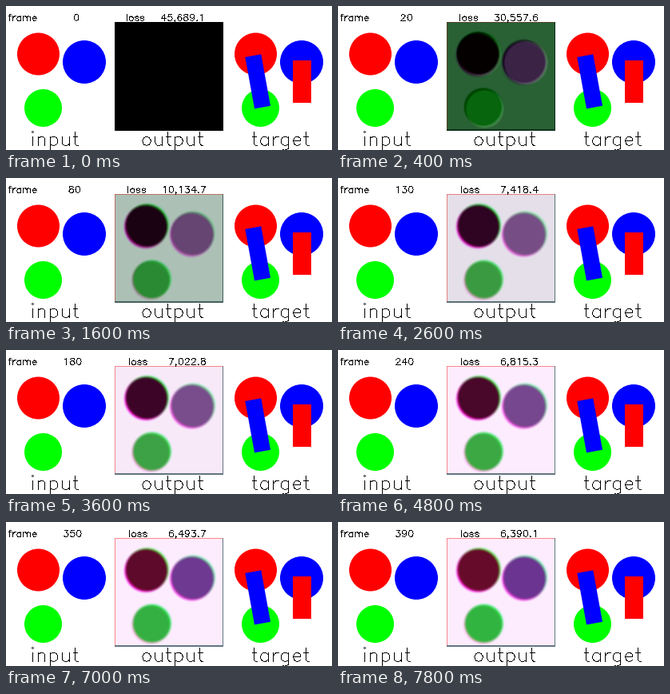
Animation, 408 px wide and 180 px high, one loop 8 s. Source, as a matplotlib script:

```python
import numpy as np
import matplotlib.pyplot as plt
from matplotlib.animation import FuncAnimation
from matplotlib.patches import Circle, Rectangle

W, H, PANEL, TOP = 408, 180, 136, 20
COUNT, STEP = 40, 10
LAST = (COUNT - 1) * STEP


# Single-stroke lettering built from lines and arcs, y up from the baseline.
def arc(cx, cy, rx, ry, start=0, end=360):
    n = max(5, round(abs(end - start) / 30) + 1)
    t = np.radians(np.linspace(start, end, n))
    return list(zip(cx + rx * np.cos(t), cy + ry * np.sin(t)))


def move(pts, dx, dy=0):
    return [(x + dx, y + dy) for x, y in pts]


def turn(pts):
    return [(20 - x, 21 - y) for x, y in pts]


DOT = [(5, 2), (4, 1), (5, 0), (6, 1), (5, 2)]
STEM = [(4, 14), (4, 0)]
BAR = [(2, 14), (9, 14)]
BOWL = arc(9.5, 7, 6.5, 7, 35, 325)
ARCH = [(4, 10)] + arc(9.5, 9, 5.5, 5, 135, 0) + [(15, 0)]
SIX = [arc(10.5, 6.5, 6.5, 6.5), arc(11, 9, 7, 12, 45, 180)]

# Each glyph: advance, strokes
GLYPHS = {
    ' ': (16, []),
    '.': (10, [DOT]),
    ',': (10, [DOT, [(6, 1), (6, -1), (4, -4)]]),
    '0': (20, [arc(10, 10.5, 7, 10.5)]),
    '1': (20, [[(6, 17), (8, 18), (11, 21), (11, 0)]]),
    '2': (20, [arc(10, 15.5, 6, 5.5, 180, -30) + [(3, 0), (17, 0)]]),
    '3': (20, [[(5, 21), (16, 21), (10, 13)] + arc(10, 6.5, 7, 6.5, 60, -150)]),
    '4': (20, [[(13, 0), (13, 21), (3, 7), (18, 7)]]),
    '5': (20, [[(15, 21), (5, 21), (4, 12)] + arc(10, 7, 7, 7, 120, -150)]),
    '6': (20, SIX),
    '7': (20, [[(3, 21), (17, 21), (7, 0)]]),
    '8': (20, [arc(10, 16.5, 6, 4.5), arc(10, 6, 7, 6)]),
    '9': (20, [turn(s) for s in SIX]),
    'a': (19, [[(15, 14), (15, 0)], BOWL]),
    'e': (18, [[(3, 8), (15, 8)] + arc(9.5, 7, 6, 7, 30, 325)]),
    'f': (12, [arc(9, 17, 4, 4, 75, 180) + [(5, 0)], BAR]),
    'g': (19, [[(15, 14)] + arc(9.5, -2, 5.5, 5, 0, -130), BOWL]),
    'i': (8, [move(DOT, -1, 20), STEM]),
    'l': (8, [[(4, 21), (4, 0)]]),
    'm': (30, [STEM, ARCH, move(ARCH, 11)]),
    'n': (19, [STEM, ARCH]),
    'o': (19, [arc(9.5, 7, 6.5, 7)]),
    'p': (19, [[(4, 14), (4, -7)], [(19 - x, y) for x, y in BOWL]]),
    'r': (13, [STEM, arc(11, 8, 7, 6, 180, 80)]),
    's': (17, [arc(8.5, 10.5, 5.5, 3.5, 10, 270) + arc(8.5, 3.5, 5.5, 3.5, 90, -170)]),
    't': (12, [[(5, 21)] + arc(9, 4, 4, 4, 180, 285), BAR]),
    'u': (19, [[(4, 14)] + arc(9.5, 5, 5.5, 5, 180, 345), [(15, 14), (15, 0)]]),
}


def write(layer, text, x, y, size):
    """Draw hard one-pixel strokes into the alpha channel."""
    for ch in text:
        advance, strokes = GLYPHS[ch]
        for pts in strokes:
            px = [(x + a * size, y - b * size) for a, b in pts]
            for (x0, y0), (x1, y1) in zip(px, px[1:]):
                n = int(np.ceil(max(abs(x1 - x0), abs(y1 - y0)))) + 1
                cols = np.rint(np.linspace(x0, x1, n)).astype(int)
                rows = np.rint(np.linspace(y0, y1, n)).astype(int)
                ok = rows < H
                layer[rows[ok], cols[ok], 3] = 255
        x += advance * size


# Loss: a slow drift plus an early bell-shaped fall.
def through(x, y):
    return np.polyfit(x, y, len(x) - 1)


drift = through([240, 300, 390], [6815.3, 6633.2, 6390.1])
early = np.array([0, 20, 50, 130])
excess = np.array([45689.1, 30557.6, 16422.9, 7418.4]) - np.polyval(drift, early)
fall = through(early, np.log(excess))


def surplus(n):
    return np.exp(np.polyval(fall, n)) if n < 240 else 0.0


def loss(n):
    return np.polyval(drift, n) + surplus(n)


def error(n):
    return np.sqrt(surplus(n) / excess[0])


def tone(n, start, gain, power, late):
    """Colour that learns quickly by gain, then creeps by late."""
    p = 1 - error(n)
    return (np.array(start) + np.array(gain) * p ** np.array(power)
            + np.array(late) * n / LAST)


GROUND = (0, 30, 0), (252, 206, 253), (1.2, 0.75, 1.05), (0, 0, 0)
DISCS = [  # x, y, radius, input colour, learned tone
    (40.5, 60, 26.5, 'red', ((0, 0, 0), (27, 0, 42), 2.5, (75, 12, 0))),
    (98, 70, 27, 'blue', ((40, 20, 50), (95, 82, 88), 1, (-27, -50, 7))),
    (46.5, 127.5, 23.5, 'lime', ((0, 85, 0), (75, 65, 75), (1.5, 1, 1.1), (-25, 30, -10))),
]
YY, XX = np.mgrid[0:PANEL, 0:PANEL] + 0.5


def soft_disc(cx, cy, r, dx, dy, blur=5.5):
    d = np.hypot(XX - cx - dx, YY + TOP - cy - dy)
    t = np.clip((r - d) / blur + 0.5, 0, 1)
    return t * t * (3 - 2 * t)


# Red and blue lean up and right, green down and left.
MASKS = [np.dstack([soft_disc(x - 0.5, y, r + 0.3, k, -k) for k in (0.8, -0.8, 0.5)])
         for x, y, r, *_ in DISCS]
RELIEF = [soft_disc(x, y, r, 1.3, 1.3, 3) - soft_disc(x, y, r, -1.3, -1.3, 3)
          for x, y, r, *_ in DISCS]


def output(n):
    ground = tone(n, *GROUND)
    img = np.ones((PANEL, PANEL, 3)) * ground
    for mask, relief, spec in zip(MASKS, RELIEF, DISCS):
        img = img * (1 - mask) + tone(n, *spec[-1]) * mask
        img += relief[..., None] * 40 * error(n)
    img[0] = img[:, 0] = ground * (0.8, 0.5, 0.5) + (48, 18, 12)
    img[-2:] = img[:, -1] = ground * (0.4, 0.5, 0.52)
    return np.clip(img, 0, 255).astype(np.uint8)


labels = np.zeros((H, W, 4), np.uint8)
for k, word in enumerate(('input', 'output', 'target')):
    write(labels, word, 30 + 138 * k, 174, 0.8)


def overlay(n):
    layer = labels.copy()
    write(layer, f'frame {n:>7}         loss {loss(n):>10,.1f}', 2, 18, 0.4)
    return layer


fig = plt.figure(figsize=(W / 100, H / 100), dpi=100, facecolor='white')
ax = fig.add_axes([0, 0, 1, 1])
ax.axis('off')

for left in (0, 2 * PANEL):
    for x, y, r, color, _ in DISCS:
        ax.add_patch(Circle((x + left, y), r, color=color, lw=0))
ax.add_patch(Rectangle((305, 61.6), 20.3, 65.5, angle=-10.3, rotation_point='center',
                       color='blue', lw=0))
ax.add_patch(Rectangle((359, 68), 23, 53, color='red', lw=0))

panel = ax.imshow(output(0), extent=(PANEL, 2 * PANEL, TOP + PANEL, TOP),
                  interpolation='nearest', zorder=2)
text = ax.imshow(overlay(0), extent=(0, W, H, 0), interpolation='nearest', zorder=3)
ax.set(xlim=(0, W), ylim=(H, 0), aspect='auto')


def update(i):
    panel.set_data(output(i * STEP))
    text.set_data(overlay(i * STEP))
    return panel, text


anim = FuncAnimation(fig, update, frames=COUNT, interval=200, repeat=True,
                     repeat_delay=0, blit=False)
plt.show()
```
